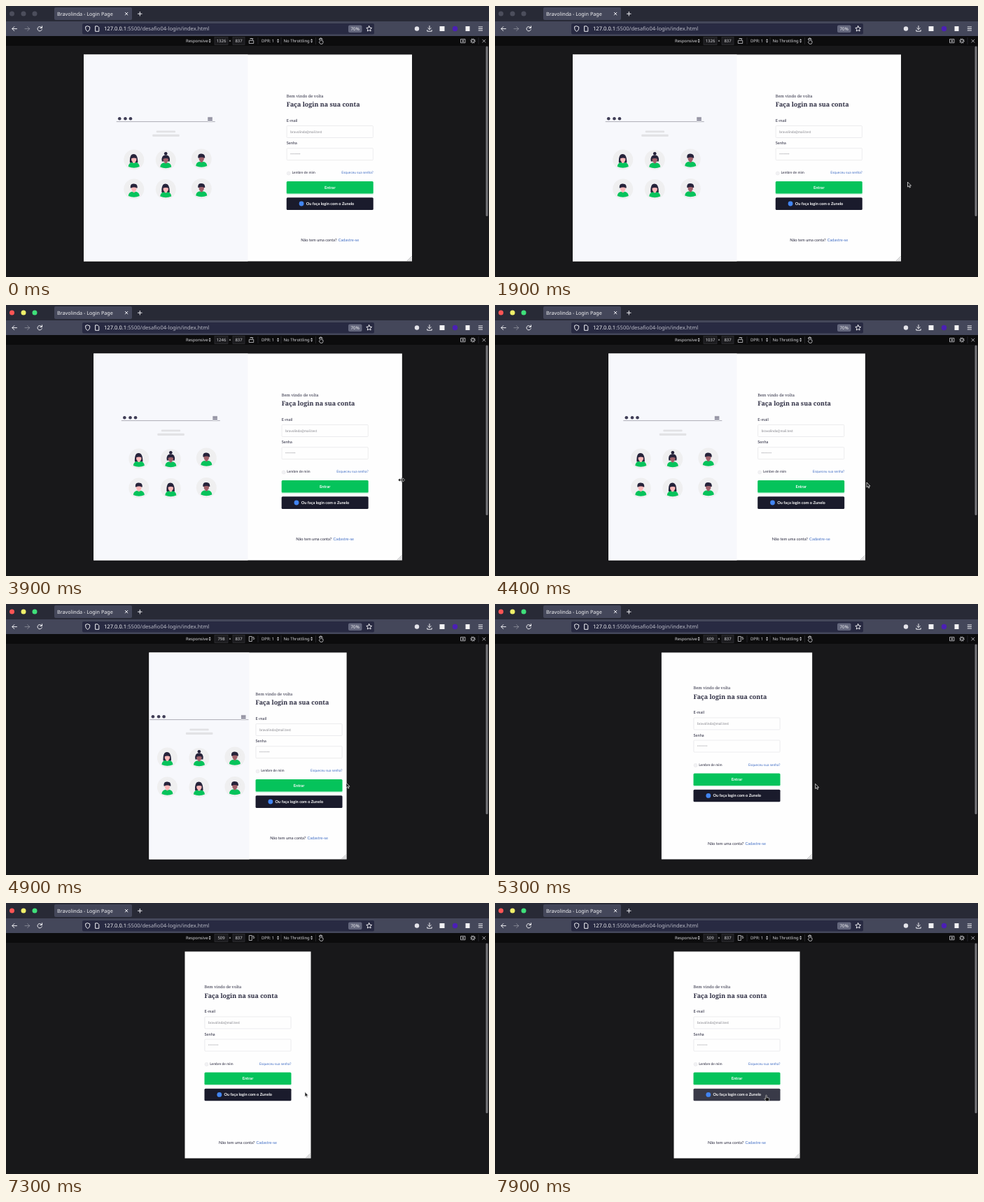
An HTML page that plays this animation: 690 by 388 pixels, repeating every 8000 ms.

```html
<!DOCTYPE html>
<html lang="pt-BR">
<head>
<meta charset="utf-8">
<title>Login Page</title>
<style>
  html, body { margin: 0; width: 100%; height: 100%; overflow: hidden; background: #18181a; }
  svg { display: block; width: 100vw; height: 100vh; }
  text { text-rendering: geometricPrecision; white-space: pre; }
  .ui { font-family: "Noto Sans", "Open Sans", sans-serif; fill: #f4f4f6; }
  .page { font-family: Lato, "Open Sans", sans-serif; font-size: 5.66px; fill: #24243a; }
  .serif { font-family: "Noto Serif", serif; fill: #2b2b40; }
  .small { font-size: 4.95px; }
  .tool { font-size: 5.95px; fill: #d6d6da; }
  .link { fill: #3f6cc4; }
  .line { fill: none; stroke: #f0f0f4; stroke-width: 1; stroke-linecap: round; stroke-linejoin: round; }
  .thin { fill: none; stroke: #cfcfd4; stroke-width: .8; stroke-linejoin: round; }
</style>
</head>
<body>
<svg viewBox="0 0 690 388" preserveAspectRatio="none">
  <defs>
    <linearGradient id="drop" x1="0" y1="0" x2="0" y2="1">
      <stop offset="0" stop-color="#05c35b" stop-opacity=".4"/>
      <stop offset="1" stop-color="#05c35b" stop-opacity="0"/>
    </linearGradient>
  </defs>
  <rect width="690" height="388" fill="#18181a"/>

  <!-- tab strip -->
  <rect width="690" height="22" fill="#282a36"/>
  <rect x="69" y="2" width="111" height="18" rx="2" fill="#44475a"/>
  <g id="lights"><circle cx="8.5" cy="11" r="3.5"/><circle cx="25" cy="11" r="3.5"/><circle cx="41" cy="11" r="3.5"/></g>
  <text class="ui" x="73" y="14" font-size="7.2">Bravolinda - Login Page</text>
  <path class="line" d="M170.3 9.3l3.6 3.6m0-3.6l-3.6 3.6M188.5 11.2h5.6m-2.8-2.8v5.6"/>

  <!-- address bar -->
  <rect y="22" width="690" height="21" fill="#44475a"/>
  <rect x="109" y="25" width="417" height="15.4" rx="2" fill="#282a42"/>
  <path class="line" d="M15.5 32.6H9m2.8-3L8.8 32.6l3 3"/>
  <path class="line" opacity=".35" d="M27 32.6h6.500m-2.800-3l3 3-3 3"/>
  <path class="line" d="M51 31a3.200 3.200 0 1 0 .3 2.700M51.500 28.800v2.700h-2.700"/>
  <path class="line" stroke-width=".9" d="M116.700 28.800l3 1.100v2.300q0 2.700-3 4.300q-3-1.600-3-4.300v-2.300z"/>
  <path class="line" d="M128 28.900h3l1.800 1.800v5.600h-4.800z"/>
  <text class="ui" x="140" y="35.300" font-size="7.6">127.0.0.1<tspan fill="#b9bac6">:5500/desafio04-login/index.html</tspan></text>
  <rect x="489" y="27.400" width="19.500" height="10.600" rx="2" fill="#63667c"/>
  <text class="ui" x="498.700" y="35" font-size="6.2" text-anchor="middle">70%</text>
  <path class="line" d="M518.700 28.600l1.200 2.500 2.700.3-2 1.900.5 2.700-2.400-1.300-2.400 1.300.5-2.700-2-1.900 2.700-.3z"/>
  <circle cx="587" cy="32.500" r="3.200" fill="#e4e4ea"/>
  <path class="line" d="M605 28.500v5m-2.200-2l2.200 2.200 2.200-2.200M601.800 34.500v1.700h6.400v-1.700"/>
  <rect x="619.500" y="29" width="7" height="7" fill="#f2f2f4"/>
  <circle cx="641.500" cy="32.500" r="3.700" fill="#4b1fb5"/>
  <rect x="656.500" y="29" width="6" height="7" fill="#f2f2f4"/>
  <path class="line" d="M675.200 30h5.400m-5.400 2.500h5.400m-5.400 2.500h5.400"/>

  <!-- device toolbar -->
  <rect y="43" width="690" height="14" fill="#0c0c0d"/>
  <g class="ui">
    <text class="tool" x="257" y="52.200">Responsive</text>
    <rect x="298" y="44.500" width="19" height="11" fill="#1c1c1f" stroke="#38383d" stroke-width=".6"/>
    <text class="tool" id="size" x="307.500" y="52.200" text-anchor="middle"></text>
    <text class="tool" x="320" y="52" text-anchor="middle">×</text>
    <rect x="324" y="44.500" width="17" height="11" fill="#1c1c1f" stroke="#38383d" stroke-width=".6"/>
    <text class="tool" x="332.500" y="52.200" text-anchor="middle">837</text>
    <text class="tool" x="365" y="52.200">DPR: 1</text>
    <text class="tool" x="396.500" y="52.200">No Throttling</text>
  </g>
  <path fill="#c8c8cc" d="M289.500 49.300l1.600-2.200 1.600 2.200zm0 1.200h3.200l-1.600 2.200zM387 49.300l1.600-2.200 1.600 2.200zm0 1.200h3.200l-1.600 2.200zM435 49.300l1.600-2.200 1.600 2.200zm0 1.200h3.200l-1.600 2.200z"/>
  <path stroke="#38383d" stroke-width=".6" d="M360 45v10M393 45v10M442.500 45v10M675 45v10"/>
  <path class="thin" id="wide" d="M347.300 49.500h6.400v4h-6.400zM349 48v-1.500h3.200v1.500m-1.200-1l1.200 1.200 1.200-1.200"/>
  <path class="thin" id="tall" d="M347.300 46.500h4v7h-4zM352.300 47.500h1.700v3m-1.200-1l1.200 1.200 1.200-1.200"/>
  <path class="thin" d="M448.700 50.500v-3.300a1 1 0 0 1 2 0v2.300l2.300.7v2.300l-1 1.800h-3l-1.800-2.500zM447.200 48.500a2.500 2.500 0 1 1 5 0"/>
  <path class="thin" d="M649.500 47.500h6.500v5.200h-6.500zM652 49.200h1.800v1.800h-1.800z"/>
  <circle cx="667" cy="50" r="2" class="thin" stroke-width="1.300"/>
  <circle cx="667" cy="50" r="3" fill="none" stroke="#cfcfd4" stroke-width="1.200" stroke-dasharray="1.200 1.156"/>
  <path class="thin" stroke-width="1" d="M680.500 47.800l4.600 4.600m0-4.600l-4.600 4.600"/>
  <rect x="685.500" y="57.500" width="3" height="243.500" rx="1.500" fill="#77777b"/>

  <!-- page -->
  <rect id="sheet" y="69.500" height="296" fill="#fefefe"/>
  <rect id="side" y="69.500" height="296" fill="#f7f8fc"/>
  <path id="grip" stroke="#a5a5a8" stroke-width=".8" d="M-7 365l6.500-6.500M-4.700 365l4.200-4.200M-2.400 365l1.900-1.900"/>

  <g id="art">
    <path stroke="#8f8f9a" stroke-width=".7" d="M-70.500 165.600h141"/>
    <g fill="#3f3d56"><circle cx="-66" cy="161.200" r="2.300"/><circle cx="-57.800" cy="161.200" r="2.300"/><circle cx="-50.300" cy="161.200" r="2.300"/></g>
    <path stroke="#3f3d56" stroke-width=".9" d="M60 159.900h6.600m-6.600 1.800h6.600m-6.600 1.800h6.600"/>
    <rect x="-13.500" y="178.500" width="27.300" height="2.800" rx="1" fill="#e2e2e5"/>
    <rect x="-19" y="183.800" width="38.500" height="3.200" rx="1" fill="#e2e2e5"/>
  </g>

  <g class="page">
    <g id="form">
      <text class="serif" y="131" font-size="5.75">Bem vindo de volta</text>
      <text class="serif" y="144.300" font-size="8.95" font-weight="700">Faça login na sua conta</text>
      <text y="165.900">E-mail</text>
      <rect x=".4" y="171.500" width="123.200" height="17" rx="1" fill="#fefefe" stroke="#e4e4e7" stroke-width=".7"/>
      <text class="small" x="5.600" y="182" fill="#85858c">bravolinda@mail.test</text>
      <text y="198.300">Senha</text>
      <rect x=".4" y="203.700" width="123.200" height="17" rx="1" fill="#fefefe" stroke="#e4e4e7" stroke-width=".7"/>
      <path d="M6.300 211.700h12.700" stroke="#66666e" stroke-width=".95" stroke-linecap="round" stroke-dasharray="0 2.100"/>
      <circle cx="3" cy="239.500" r="2.600" fill="#f1f1f3" stroke="#e2e2e5" stroke-width=".4"/>
      <text class="small" x="7.700" y="240.300">Lembre de mim</text>
      <text class="small link" x="124" y="240.300" text-anchor="end">Esqueceu sua senha?</text>
      <rect y="267" width="124" height="4" fill="url(#drop)"/>
      <rect y="251" width="124" height="17.500" rx="1.500" fill="#05c35b"/>
      <text x="62" y="262" text-anchor="middle" font-weight="700" fill="#fff">Entrar</text>
      <rect id="alt" y="274.300" width="124" height="17.600" rx="1.500"/>
      <circle cx="21.300" cy="283" r="3.400" fill="#4285f4"/>
      <text x="28" y="284.700" font-weight="700" fill="#fff">Ou faça login com o Zunelo</text>
    </g>
    <text id="foot" y="336.500" text-anchor="middle">Não tem uma conta? <tspan class="link" dx=".8">Cadastre-se</tspan></text>
  </g>

  <!-- pointers, drawn with the hot spot at 0,0 -->
  <g id="pointer" stroke-linejoin="round">
    <path id="arrow" fill="#18181a" stroke="#f4f4f4" stroke-width=".7" d="M0 0v7l1.600-1.400 1.200 2.500 1.200-.6-1.200-2.300h2.200z"/>
    <g id="resize">
      <path fill="#111" stroke="#fff" stroke-width=".5" d="M-5 0l3-2.600v1.900h4v-1.900l3 2.600-3 2.600v-1.900h-4v1.900z"/>
      <path stroke="#111" stroke-width=".7" d="M0-3v6"/>
    </g>
    <path id="hand" fill="#111" stroke="#f4f4f4" stroke-width=".6" d="M-.7.500q.7-1 1.400 0v3l3 .7q.8.300.6 1.200l-.5 3.100h-4l-2.500-3q0-1 1.200-.6l.8.600z"/>
  </g>
</svg>

<script>
const LOOP = 8000, STEP = 100;
const SCALE = 0.3537, MID = 345.5;
const $ = id => document.getElementById(id);
const set = (id, name, value) => $(id).setAttribute(name, value);
const show = (id, on) => set(id, "visibility", on ? "inherit" : "hidden");

// time, viewport width in CSS pixels
const widths = [
  [3400, 1326], [3600, 1302], [3900, 1246], [4100, 1179], [4400, 1037], [4900, 798],
  [5000, 738], [5200, 640], [5500, 546], [5600, 546], [6100, 524], [6400, 509]
];
// time, pointer x, pointer y
const moves = [
  [1300, 674, 304], [1500, 640, 282], [1700, 606, 259], [1900, 589.5, 252],
  [2000, 589.5, 252], [2200, 586, 251.5], [2300, 586, 251.5], [2500, 585, 251.500],
  [2700, 585, 251.5], [2800, 583.5, 251.5], [2900, 583.5, 251.5], [3100, 580, 250.500],
  [3400, 580, 250.5], [3900, 565, 250.5], [4100, 554, 251], [4400, 531, 254],
  [4900, 486, 256], [5000, 475, 256.5], [5500, 446, 258], [5600, 446, 258],
  [6100, 443, 258], [6400, 440, 258], [7200, 440, 258], [7400, 414, 283],
  [7500, 400, 287], [7600, 391, 280], [7700, 391, 280], [7800, 387.5, 275]
];

function track(keys, t) {
  if (t <= keys[0][0]) return keys[0].slice(1);
  const i = keys.findIndex(k => k[0] >= t);
  if (i < 0) return keys[keys.length - 1].slice(1);
  const a = keys[i - 1], b = keys[i], p = (t - a[0]) / (b[0] - a[0]);
  return a.slice(1).map((v, n) => v + (b[n + 1] - v) * p);
}

const HAIR = {
  long: "M-5.800 4.500q-.8-12.500 5.300-12.500q6.300 0 6 12.500z",
  bun: "M-5.500 2q-1.500-9 5.500-9.300q7 .3 5.500 9.300z",
  short: "M-4.900-1.500q-.7-5.800 3.900-6q6.300-.6 6 6z"
};

function avatar(x, y, style, skin) {
  const bun = style === "bun" ? '<circle cy="-9.300" r="2.300" fill="#25233a"/>' : "";
  const hair = `<path fill="#25233a" d="${HAIR[style]}"/>`;
  const fringe = '<path fill="#25233a" d="M-4.200-1.500q.5-4.800 4.200-4.800t4.200 4.800q-4-1.800-8.400 0z"/>';
  return `<g transform="translate(${x} ${y})">
    <circle r="14.500" fill="#efeff0"/>${bun}${hair}
    <path fill="${skin}" d="M-1.800 1h3.600v4.500h-3.600z"/>
    <path fill="#05c35b" d="M-8 10q.4-5.500 5.500-6.300q2.500 2.600 5 0q5.100.8 5.500 6.300q-8 3.500-16 0z"/>
    <ellipse cy="-1" rx="3.700" ry="4.500" fill="${skin}"/>${fringe}</g>`;
}

const PALE = "#ffb8b8", BROWN = "#a0616a";
$("art").insertAdjacentHTML("beforeend", [
  [-45.5, 220, "long", PALE], [0, 220.500, "bun", BROWN], [51, 219, "short", BROWN],
  [-45.5, 262, "short", PALE], [0, 262.500, "long", PALE], [51, 261.500, "short", BROWN]
].map(a => avatar(...a)).join(""));

function layout(width) {
  const w = width * SCALE, left = MID - w / 2, right = MID + w / 2;
  const phone = width < 768;
  // the columns run into their minimum widths on narrow tablets
  const push = phone ? 0 : Math.max(0, (310 - w) * 0.09);
  const center = phone ? MID : MID + w / 4 + push;
  const lift = phone ? 8.6 : 0;

  set("sheet", "x", left);
  set("sheet", "width", w);
  set("side", "x", left);
  set("side", "width", w / 2 + push * 0.8);
  set("grip", "transform", `translate(${right} 0)`);
  set("art", "transform", `translate(${MID - w / 4 + push * 0.4} 0)`);
  set("form", "transform", `translate(${center - 62} ${-lift})`);
  set("foot", "transform", `translate(${center} ${lift})`);
  show("side", !phone);
  show("art", !phone);
  show("wide", width >= 837);
  show("tall", width < 837);
  $("size").textContent = Math.round(width);
}

function draw(t) {
  layout(track(widths, t)[0]);

  const focused = t >= 3300;
  const colors = focused ? ["#ff5555", "#f1f06a", "#3fe07a"] : Array(3).fill("#4c4e5c");
  [...$("lights").children].forEach((dot, i) => dot.setAttribute("fill", colors[i]));

  const [x, y] = track(moves, t);
  const hover = t >= 7600, drag = t >= 3100 && t < 4200;
  set("pointer", "transform", `translate(${x} ${y})`);
  set("pointer", "visibility", t >= 1300 ? "visible" : "hidden");
  show("hand", hover);
  show("resize", drag);
  show("arrow", !hover && !drag);
  set("alt", "fill", hover ? "#393a48" : "#1a1b2c");
}

function tick() {
  const t = performance.now() % LOOP;
  draw(Math.floor(t / STEP) * STEP);
  requestAnimationFrame(tick);
}
tick();
</script>
</body>
</html>
```
